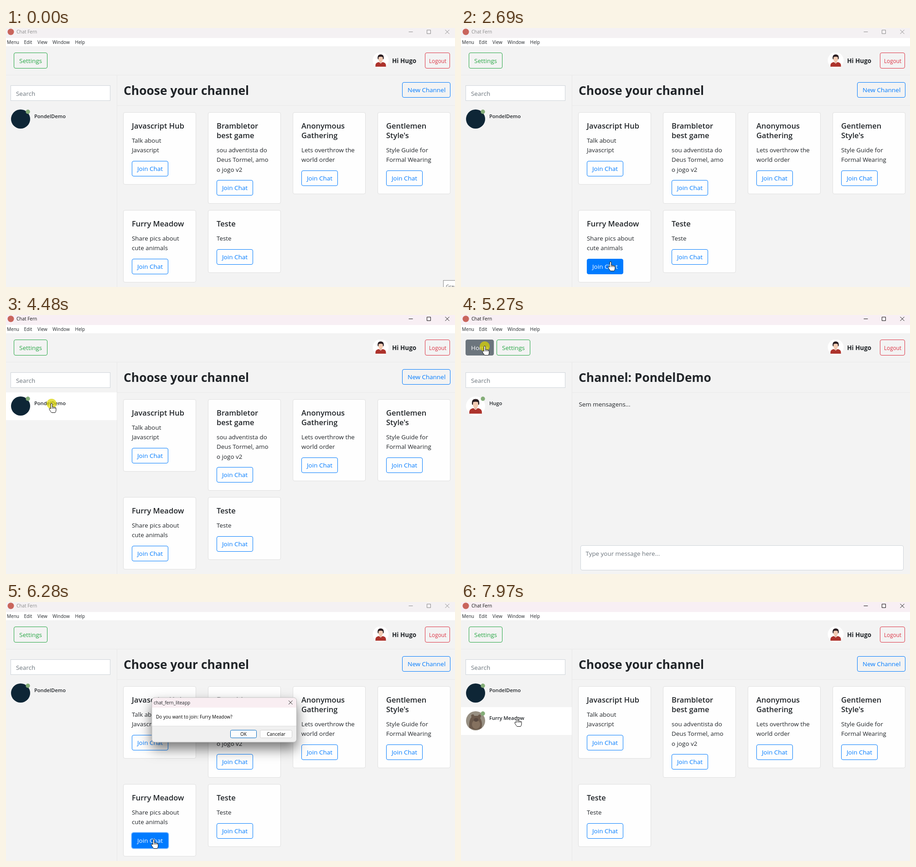
Write an HTML page that moves like this. It is 985 px wide and 569 px high and loops after 8000 ms.

```html
<!DOCTYPE html>
<html lang="en">
<head>
<meta charset="utf-8">
<title>Chat Fern</title>
<style>
  html, body { margin: 0; width: 100%; height: 100%; overflow: hidden; background: #f3f3f3; }
  svg { display: block; width: 100vw; height: 100vh; font-family: "Open Sans", "Noto Sans", sans-serif; white-space: pre; }
</style>
</head>
<body>
<svg id="stage" viewBox="0 0 985 569"></svg>
<script>
const LOOP = 8000, BLUE = '#007bff', GREEN = '#28a745', INK = '#212529', GREY = '#6c757d';
const stage = document.getElementById('stage');

// Cursor stops: time, x, y, easing of the way there
const linear = u => u, smooth = u => u * u * (3 - 2 * u), easeOut = u => 1 - (1 - u) ** 2;
const path = [
  [0, 988, 572, linear], [70, 988, 572, linear], [810, 690, 328, smooth],
  [1180, 690, 328, linear], [1490, 490, 422, smooth], [1950, 320, 522, easeOut],
  [2590, 320, 522, linear], [3370, 500, 351, smooth],
  [3410, 500, 351, linear], [3540, 339, 360, linear], [4010, 100, 195, easeOut],
  [4560, 100, 195, linear], [5010, 52, 69, smooth],
  [5390, 52, 69, linear], [5730, 324, 522, smooth],
  [6380, 324, 522, linear], [6930, 535, 289, smooth],
  [7310, 535, 289, linear], [7710, 143, 250, smooth],
  [7800, 143, 250, linear], [7970, 123, 254, smooth], [LOOP, 123, 254, linear]
];
const clicks = [4480, 5265, 6070, 7240];
const dialogFrom = 6210, dialogTo = 7310;

let now = 0, pointer = [0, 0], overLink = false;

function cursorAt(t) {
  const i = Math.max(1, path.findIndex(k => k[0] >= t));
  const [t0, x0, y0] = path[i - 1], [t1, x1, y1, ease] = path[i];
  const u = ease(Math.min(1, Math.max(0, (t - t0) / (t1 - t0))));
  return [x0 + (x1 - x0) * u, y0 + (y1 - y0) * u];
}

const within = (t0, t1) => now >= t0 && now < t1;
const dialogOpen = () => within(dialogFrom, dialogTo);
const inside = ([px, py], x, y, w, h) => px >= x && px <= x + w && py >= y && py <= y + h;

// Share of the last 80 ms the cursor spent in a box, so highlights fade
function hover(...box) {
  if (dialogOpen()) return 0;
  if (inside(pointer, ...box)) overLink = true;
  let n = 0;
  for (let i = 0; i < 8; i++) n += inside(cursorAt(Math.max(0, now - i * 10)), ...box);
  return n / 8;
}

const text = (x, y, s, size = 13.4, fill = INK, weight = 400, more = '') =>
  `<text x="${x}" y="${y}" font-size="${size}" fill="${fill}" font-weight="${weight}" ${more}>${s}</text>`;
const rect = (x, y, w, h, fill, stroke = 'none', r = 0, more = '') =>
  `<rect x="${x}" y="${y}" width="${w}" height="${h}" rx="${r}" fill="${fill}" stroke="${stroke}" ${more}/>`;
const circle = (x, y, r, fill) => `<circle cx="${x}" cy="${y}" r="${r}" fill="${fill}"/>`;
const shape = (d, fill, more = '') => `<path d="${d}" fill="${fill}" ${more}/>`;
const line = (d, stroke) => `<path d="${d}" fill="none" stroke="${stroke}"/>`;

function button(x, y, w, h, label, color, held = false, size = 13.5, pad = 11.5) {
  const k = held ? 1 : hover(x, y, w, h);
  const ink = `style="fill:color-mix(in srgb, #fff ${k * 100}%, ${color})"`;
  return rect(x, y, w, h, color, color, 3.5, `fill-opacity="${k}"`) +
    text(x + pad, y + h / 2 + 5, label, size, color, 400, ink);
}

function card(col, y, title, body, held) {
  const x = 257.5 + col * 186, lines = title.length + body.length;
  const top = Math.floor(y + 107 + 21.2 * (lines - 3)) + 0.5;
  let s = rect(x, y, 159, top - y + 51, '#fefefe', '#dfdfdf', 3.5);
  title.forEach((l, i) => s += text(x + 18.5, y + 35.5 + 21.2 * i, l, 16.5, INK, 600));
  body.forEach((l, i) => s += text(x + 18.5, y + 66.5 + 21.2 * (title.length - 1 + i), l));
  if (held) s += rect(x + 18, top - 1, 81, 35, 'none', '#80bdff', 4.5, 'stroke-width="2"');
  return s + button(x + 19, top, 79, 33, 'Join Chat', BLUE, held);
}

function person(x, y, r) {
  return circle(x, y, r, '#fff') + `<g transform="translate(${x} ${y}) scale(${r / 17.5})">` +
    shape('M-11.5 14V10Q-11 5.5-5 4H5Q11 5.5 11.5 10V14Z', '#ad332c') +
    shape('M-4 4L0 7 4 4Z', '#f4f4f4') +
    shape('M-2.5 0H2.5V4L0 6-2.5 4Z', '#e3b095') +
    '<ellipse cy="-3" rx="5.2" ry="6.5" fill="#f3cbb3"/>' +
    shape('M-6.5-3Q-8-13 0-13 8-13 6.5-3L5-2 4.5-7Q0-9-4.5-7L-5-2Z', '#2a1d21') + '</g>';
}

const critter = (x, y) => circle(x, y, 21, '#989083') + `<g transform="translate(${x} ${y})">` +
  shape('M-14 15Q-15-2-9-8-11-14-7-14-4-15-3-11H5Q8-16 11-13 13-9 10-6 16 3 13 16 0 24-14 15Z', '#6c5a4c') +
  '<ellipse cx="1" cy="8" rx="9" ry="10" fill="#85715f"/><ellipse cx="1" cy="-2" rx="5" ry="4" fill="#594940"/></g>';

function row(i, name, picture) {
  const y = 170 + 61 * i;
  return rect(0, y, 243, 61, '#fff', 'none', 0, `opacity="${hover(0, y, 243, 60.5)}"`) +
    picture + circle(48, y + 14, 4.7, '#84ad78') + text(62, y + 28.2, name, 11.1, INK, 600);
}

function frameBar() {
  const active = within(4480, dialogFrom) || now >= dialogTo;
  const ink = active ? '#111' : '#8b8b8b';
  let s = rect(0, 0, 985, 22, active ? '#f8eff4' : '#f4f1f3') + rect(0, 22, 985, 18, '#fff') +
    circle(10.5, 8.5, 7, '#c9655c') + text(23, 12.3, 'Chat Fern', 10, ink) +
    line('M883.5 8.5H892.5M923.5 4.5H931.5V12.5H923.5ZM963.5 4L972.5 13M972.5 4L963.5 13', ink);
  [[2, 'Menu'], [39.5, 'Edit'], [69, 'View'], [102, 'Window'], [151.5, 'Help']]
    .forEach(([x, l]) => s += text(x, 34.5, l, 10));
  return s;
}

function shell(inChannel) {
  return line('M0 103.5H985M243.5 104V569M244 170.5H985', '#e9e9e9') +
    (inChannel ? button(10.5, 54.5, 61, 34, 'Home', GREY) : '') +
    button(inChannel ? 78.5 : 17.5, 54.5, 73, 34, 'Settings', GREEN) +
    person(822, 71, 17.5) + text(847, 76.8, 'Hi Hugo', 13.5, INK, 700) +
    button(919.5, 54.5, 54, 34, 'Logout', '#dc3545', false, 11.8, 8.5) +
    rect(10.5, 126.5, 218, 33, '#fff', '#ced4da') + text(22, 149, 'Search', 13.4, GREY);
}

const heading = s => text(258, 147, s, 26.4, INK, 700);

function channel() {
  return row(0, 'Hugo', person(32, 200, 21)) + heading('Channel: PondelDemo') +
    text(258.5, 201, 'Sem mensagens...') +
    rect(262.5, 506.5, 708, 54, '#fff', '#ced4da', 3.5) +
    text(273.5, 528.5, 'Type your message here...', 13.4, GREY);
}

function home(joined) {
  let s = row(0, 'PondelDemo', circle(32, 200, 21, '#0e2636'));
  if (joined) s += row(1, 'Furry Meadow', critter(32, 261));
  s += heading('Choose your channel') + button(869.5, 119.5, 105, 33, 'New Channel', BLUE) +
    card(0, 185.5, ['Javascript Hub'], ['Talk about', 'Javascript']) +
    card(1, 185.5, ['Brambletor', 'best game'], ['sou adventista do', 'Deus Tormel, amo', 'o jogo v2']) +
    card(2, 185.5, ['Anonymous', 'Gathering'], ['Lets overthrow the', 'world order']) +
    card(3, 185.5, ['Gentlemen', "Style's"], ['Style Guide for', 'Formal Wearing']);
  if (!joined) s += card(0, 400.5, ['Furry Meadow'], ['Share pics about', 'cute animals'], within(6070, dialogTo));
  return s + card(joined ? 0 : 1, 400.5, ['Teste'], ['Teste']);
}

function dialog() {
  const lit = inside(pointer, 492, 281, 58, 18);
  const mid = 'text-anchor="middle"';
  return rect(320, 210, 317.5, 98, '#f0f0f0', '#b5b5b5', 6.5, 'style="filter:drop-shadow(0 14px 14px #0008)"') +
    shape('M320.5 232V217Q320.5 210.5 327 210.5H630.5Q637 210.5 637 217V232Z', '#f9eef2') +
    rect(320.5, 232, 316.5, 40, '#fff') + line('M320.5 272.5H637', '#dfdfdf') +
    text(324, 225, 'chat_fern_liteapp', 10) + text(329, 256, 'Do you want to join: Furry Meadow?', 10, '#000') +
    line('M620 216.5L628.5 225M628.5 216.5L620 225', '#222') +
    rect(492.5, 281.5, 57, 17, lit ? '#e0eef9' : '#fdfdfd', '#0067c0', 3) + text(521, 293.8, 'OK', 10, '#000', 400, mid) +
    rect(557.5, 281.5, 70, 17, '#fdfdfd', '#d0d0d0', 3) + text(592.5, 293.8, 'Cancelar', 10, '#000', 400, mid);
}

function cursor() {
  const outline = 'stroke="#111" stroke-linejoin="round"';
  let s = clicks.some(t => within(t, t + 125)) ? circle(0, 0, 11, '#d9d400b8') : '';
  if (dialogOpen() && now > 6500)
    s += line('M-3.5-7.5Q0-7.5 0-6 0-7.5 3.5-7.5M0-6V6M-3.5 7.5Q0 7.5 0 6 0 7.5 3.5 7.5', '#111');
  else if (overLink || dialogOpen())
    s += shape('M-1.7 11V.8a1.7 1.7 0 0 1 3.4 0V7q2.6-.9 2.9 .6 2.5-.6 2.8 .8 2.4-.4 2.4 1.6V14q0 3-2 5.5H0Q-2.5 17-4.5 13q-1.4-2.6 .2-3.2 1.3-.3 2.6 1.2ZM1.7 7V11M4.6 7.6V11M7.4 8.4V11', '#fff', outline);
  else
    s += shape('M0 0V15.5L3.6 12.2 6 17.6 8.4 16.5 6 11.3H11Z', '#fff', outline);
  return `<g transform="translate(${pointer.map(v => v.toFixed(1)).join(' ')})">${s}</g>`;
}

function render(t) {
  now = t;
  pointer = cursorAt(t);
  overLink = false;
  const inChannel = within(4550, 5400);
  return rect(0, 0, 985, 569, '#f3f3f3') + frameBar() + shell(inChannel) +
    (inChannel ? channel() : home(t >= 7380)) +
    (dialogOpen() ? dialog() : '') +
    (t < 140 ? rect(959.5, 554.5, 60, 30, '#fff', '#8a8a8a') + text(965, 571.5, 'Gravar', 10, '#555') : '') +
    cursor();
}

let start, shown;
function tick(t) {
  start ??= t;
  const next = render((t - start) % LOOP);
  if (next !== shown) stage.innerHTML = shown = next;
  requestAnimationFrame(tick);
}
requestAnimationFrame(tick);
</script>
</body>
</html>
```
